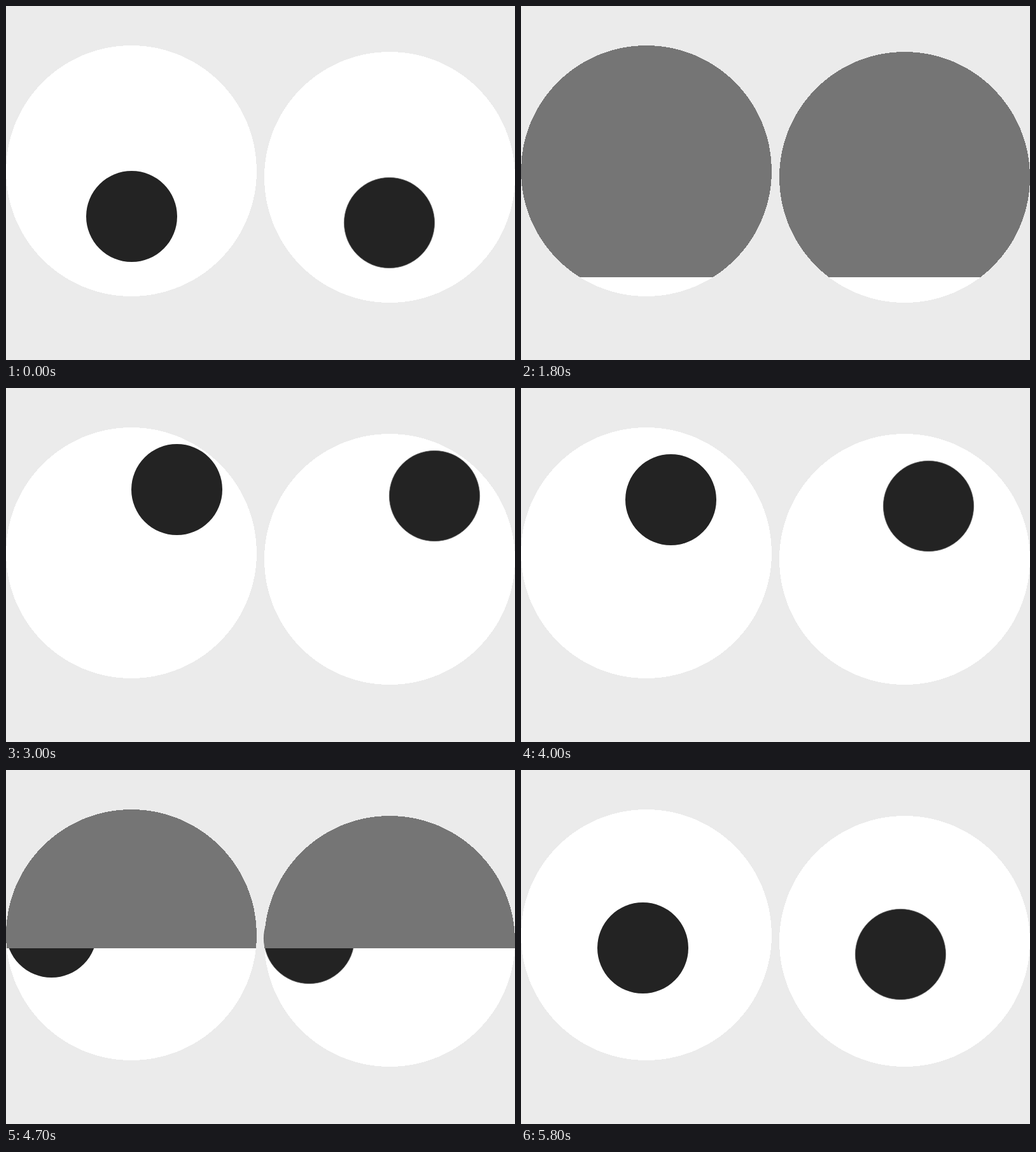
Recreate the animation shown at these times as an HTML page. Size 800 px wide and 556 px high, loop 8000 ms.

```html
<!DOCTYPE html>
<html lang="en">
<head>
<meta charset="utf-8">
<title>Blinking eyes</title>
<style>
  html, body { margin: 0; width: 100%; height: 100%; overflow: hidden; background: #ebebeb; }
  svg { display: block; width: 100%; height: 100%; }
  .ball { fill: #fff; shape-rendering: crispEdges; }
  .lid { fill: #757575; shape-rendering: crispEdges; }
  .pupil { fill: #232323; }
  .soft { stroke: #666; stroke-width: .8; }
</style>
</head>
<body>
<svg viewBox="0 0 800 556">
  <defs>
    <clipPath id="shade"><rect id="cover" width="800" height="0"/></clipPath>
  </defs>
  <circle class="ball" cx="197" cy="259" r="197"/>
  <circle class="ball" cx="603" cy="269" r="197"/>
  <g id="gaze">
    <circle class="pupil" cx="71.5" cy="71.5" r="71.5"/>
    <circle class="pupil soft" cx="476.5" cy="81.5" r="71.1"/>
  </g>
  <g clip-path="url(#shade)">
    <circle class="lid" cx="197" cy="259" r="197"/>
    <circle class="lid" cx="603" cy="269" r="197"/>
  </g>
</svg>
<script>
  const LOOP = 8000;
  const STEP = 100;
  const LID_SPEED = 1.395; // px per ms

  // Pupil path: time, left, top. Straight moves with rests between them.
  const path = [
    [0, 126, 259], [200, 124, 311], [1100, 124, 311], [1700, 160, 179],
    [2400, 132, 192], [3000, 197, 88], [3900, 197, 88], [4500, 0, 183],
    [5200, 0, 183], [5800, 120, 208], [LOOP, 120, 208]
  ];

  // Blinks: start and duration in ms.
  const blinks = [[1494.6, 850], [4499.6, 830]];

  const gaze = document.getElementById('gaze');
  const cover = document.getElementById('cover');

  function pupilAt(t) {
    const i = path.findIndex(p => p[0] > t);
    const [t0, x0, y0] = path[i - 1];
    const [t1, x1, y1] = path[i];
    const k = (t - t0) / (t1 - t0);
    return [x0 + (x1 - x0) * k, y0 + (y1 - y0) * k].map(Math.round);
  }

  function lidAt(t) {
    const depth = blinks.map(([start, span]) => Math.min(t - start, start + span - t));
    return Math.round(Math.max(0, ...depth) * LID_SPEED);
  }

  function draw(time) {
    const t = Math.floor((time % LOOP) / STEP) * STEP;
    gaze.setAttribute('transform', `translate(${pupilAt(t)})`);
    cover.setAttribute('height', lidAt(t));
  }

  const begin = performance.now();
  function tick() {
    draw(performance.now() - begin);
    requestAnimationFrame(tick);
  }
  tick();
</script>
</body>
</html>
```
